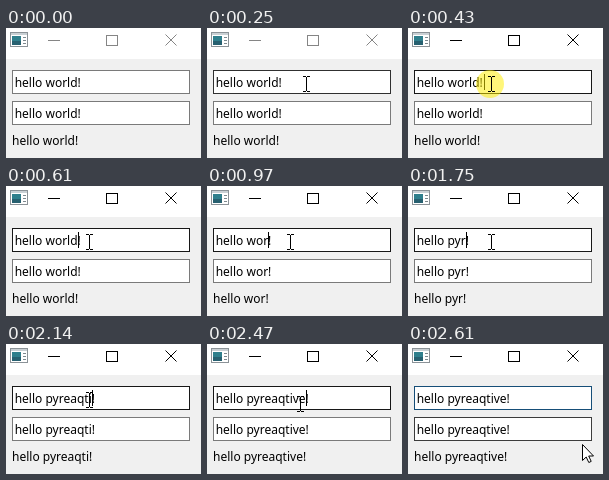
Animation, 195 px wide and 130 px high, one loop 2.64 s. Source, as an HTML page:

```html
<!DOCTYPE html>
<html lang="en">
<head>
<meta charset="utf-8">
<title>Linked text fields</title>
<style>
  html, body { margin: 0; width: 100%; height: 100%; overflow: hidden; background: #f0f0f0; }
  svg { display: block; width: 100vw; height: 100vh; }
  text { font: 12px "Noto Sans", "Open Sans", sans-serif; fill: #000; white-space: pre; }
  .crisp { shape-rendering: crispEdges; }
  .line { fill: none; stroke-width: 1; }
</style>
</head>
<body>
<svg viewBox="0 0 195 130">
  <rect width="195" height="31" fill="#fff"/>
  <g class="crisp">
    <rect x="4.5" y="4.5" width="17" height="14" fill="#fff" stroke="#8b9297"/>
    <rect x="5" y="5" width="16" height="2" fill="#c9d0d4"/>
    <rect x="6" y="8" width="9" height="9" fill="#2f7f8c"/>
    <rect x="6" y="13" width="9" height="4" fill="#276070"/>
    <path d="M17 9.5h3M17 12.5h3M17 15.5h3" stroke="#7d888e"/>
  </g>
  <g id="buttons" class="line">
    <path class="crisp" d="M42 12.5h12M100.5 7.5h11v10h-11z"/>
    <path d="M159.5 6.5l11 11M170.5 6.5l-11 11"/>
  </g>
  <g class="crisp">
    <rect id="box1" x="6.5" y="42.5" width="177" height="23" fill="#fff"/>
    <rect id="box2" x="6.5" y="73.5" width="177" height="23" fill="#fff"/>
  </g>
  <text x="8.7" y="59"></text>
  <text x="8.7" y="90"></text>
  <text x="6" y="117"></text>
  <rect id="caret" class="crisp" y="46" width="1" height="16"/>
  <circle id="click" cx="82" cy="56" r="14" fill="#ffee00" fill-opacity=".52"/>
  <path id="beam" class="line crisp" stroke="#000"
        d="M-3 -7.5h3M1 -7.5h3M.5 -7v14M-3 7.5h3M1 7.5h3"/>
  <path id="arrow" fill="#fff" stroke="#000" stroke-width="1"
        d="M.5 .5V16.5L4.2 13L6.8 18.5L9.2 17.4L6.7 12H11.5Z"/>
</svg>
<script>
const LOOP = 2640;
const GREY = '#7a7a7a', BLACK = '#171717';
const el = id => document.getElementById(id);
const texts = [...document.querySelectorAll('text')];

// Pointer steps: time, shape, x, y
const pointer = [
  [0, '', 0, 0], [130, 'arrow', 154, 98], [160, 'beam', 138, 86],
  [190, 'beam', 122, 74], [220, 'beam', 108, 62], [250, 'beam', 99, 56],
  [280, 'beam', 92, 56], [310, 'beam', 87, 56], [340, 'beam', 83, 56],
  [2470, 'beam', 93, 60], [2500, 'beam', 114, 72], [2540, 'beam', 142, 87],
  [2580, 'arrow', 165, 98], [2610, 'arrow', 174, 100]
];

// Border steps: time, upper box, lower box
const borders = [
  [0, GREY, GREY], [160, GREY, '#555'], [190, GREY, '#444'],
  [220, '#444', '#606060'], [250, '#303030', GREY], [280, BLACK, GREY],
  [2500, '#17232e', '#606060'], [2540, '#133650', '#303030'],
  [2580, '#154a73', '#303030'], [2610, '#164e78', '#3c3c3c']
];

// Text steps: time, content
const edits = [[0, 'hello world!']];
let stem = 'hello world';
const edit = (time, next) => edits.push([time, (stem = next) + '!']);
[840, 970, 1050, 1110, 1170, 1230].forEach(t => edit(t, stem.slice(0, -1)));
const typing = [1460, 1520, 1570, 1750, 1800, 1890, 1970, 2060, 2140, 2190, 2220];
[...' pyreaqtive'].forEach((c, i) => edit(typing[i], stem + c));

const at = (steps, t) => steps.findLast(s => s[0] <= t);
const show = (node, on) => node.setAttribute('visibility', on ? 'visible' : 'hidden');

function draw(t) {
  const [, shape, x, y] = at(pointer, t);
  for (const id of ['beam', 'arrow']) {
    show(el(id), id === shape);
    el(id).setAttribute('transform', `translate(${x} ${y})`);
  }

  const [, upper, lower] = at(borders, t);
  el('box1').setAttribute('stroke', upper);
  el('box2').setAttribute('stroke', lower);
  el('buttons').setAttribute('stroke', t < 400 ? '#858585' : '#000');

  const value = at(edits, t)[1];
  for (const node of texts) if (node.textContent !== value) node.textContent = value;

  const before = texts[0].getSubStringLength(0, value.length - 1);
  el('caret').setAttribute('x', t < 610 ? 76 : Math.round(8.7 + before));
  show(el('caret'), t >= 400 && t < 2500);
  show(el('click'), t >= 400 && t < 460);
}

const start = performance.now();
function tick() {
  draw((performance.now() - start) % LOOP);
  requestAnimationFrame(tick);
}
tick();
</script>
</body>
</html>
```
